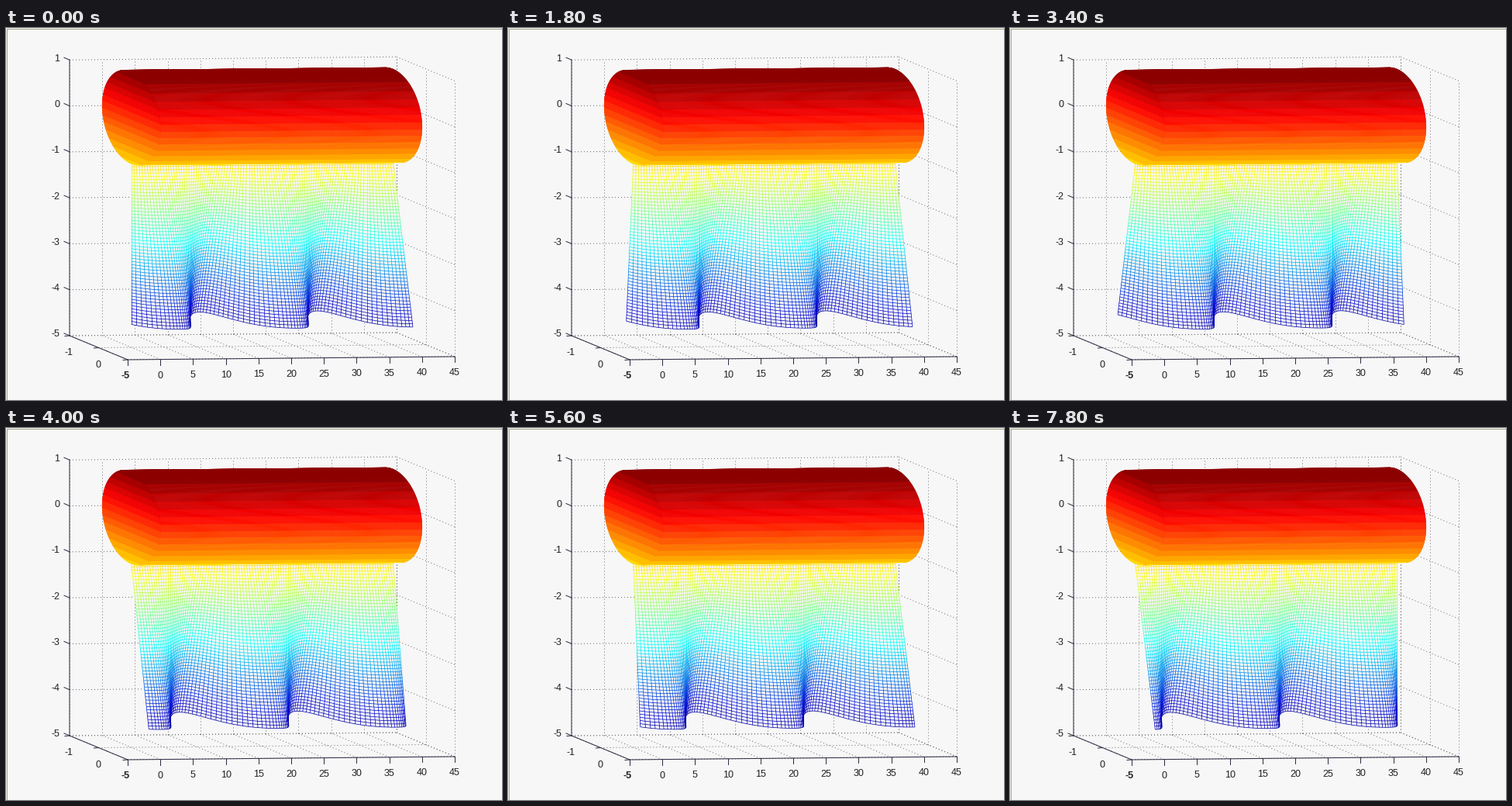
A matplotlib script that plays this animation: 640 px wide and 480 px high, repeating every 8000 ms.

```python
import numpy as np
import matplotlib.pyplot as plt
from matplotlib.animation import FuncAnimation
from matplotlib.collections import LineCollection, PolyCollection

W, H, DPI = 640, 480, 100
PX = 72 / DPI                      # one pixel in points
FRAMES, STEP = 40, 200
BG, INK = "#f7f7f7", "#2c2c44"
LENGTH, WAVE, DEPTH, SWAY = 40, 18, 3.5, 0.2
XS = np.linspace(0, LENGTH, 101)   # mesh columns
RS = np.linspace(0, DEPTH, 52)     # mesh rows


def project(x, y, z):
    """Orthographic view: data to stage pixels, stacked on the last axis."""
    x, y, z = np.broadcast_arrays(x, y, z)
    px = 82 + 8.44 * (x + 5) + 37.5 * (y + 1)
    py = 397 - 0.08 * (x + 5) + 15.5 * (y + 1) - 59.3 * (z + 5)
    return np.stack([px, py], axis=-1)


def jet(z):
    v = np.clip((np.asarray(z, float) + 5) / 6, 0, 1)
    return np.stack([np.clip(1.5 - np.abs(4 * v - c), 0, 1) for c in (3, 2, 1)], axis=-1)


fig = plt.figure(figsize=(W / DPI, H / DPI), dpi=DPI, facecolor=BG)
ax = fig.add_axes([0, 0, 1, 1])
ax.set_xlim(0, W)
ax.set_ylim(H, 0)
ax.axis("off")


def draw_box():
    xt, yt, zt = range(-5, 50, 5), (-1, 0, 1), range(-5, 2)
    grid = []
    for x in xt:
        grid.append([(x, -1, -5), (x, -1, 1)])
        grid.append([(x, -1, -5), (x, 1, -5)])
    for y in yt:
        grid.append([(45, y, -5), (45, y, 1)])
        grid.append([(-5, y, -5), (45, y, -5)])
    for z in zt:
        grid.append([(-5, -1, z), (45, -1, z)])
        grid.append([(45, -1, z), (45, 1, z)])
    lines = [project(*np.array(g, float).T) for g in grid]
    ax.add_collection(LineCollection(lines, colors="#6a6a6a", linewidths=PX,
                                     linestyles=[(0, (1, 3))], zorder=1))

    corners = np.array([(-5, -1, 1), (-5, -1, -5), (-5, 1, -5), (45, 1, -5)], float)
    ax.plot(*project(*corners.T).T, color=INK, lw=PX, zorder=2)

    font = dict(family="Liberation Sans", fontsize=12.5 * PX, color="#202020",
                va="center_baseline")

    def tick(p, dx, dy):
        ax.plot([p[0], p[0] + dx], [p[1], p[1] + dy], color=INK, lw=PX, zorder=2)

    for x in xt:
        p = project(x, 1, -5)
        tick(p, 0, 7)
        first = x == -5
        ax.text(p[0] - 3 * first, p[1] + 19.5, str(x), ha="center",
                weight="bold" if first else "normal", **font)
    for y in yt:
        p = project(-5, y, -5)
        tick(p, -6, 0.5)
        if y < 1:
            ax.text(p[0] - 1, p[1] + 21, str(y), ha="center", **font)
    for z in zt:
        p = project(-5, -1, z)
        tick(p, -7, -3)
        ax.text(69.5, p[1] - 3, str(z), ha="right", **font)


def draw_cylinder():
    tilt = np.arctan2(15.5, 59.3)

    def strips(start, end, x0, x1, left):
        a = np.linspace(start, end, 181)
        y, z = np.sin(a), np.cos(a)
        near, far = project(x0, left * y, z), project(x1, y, z)
        quads = np.stack([near[:-1], far[:-1], far[1:], near[1:]], axis=1)
        mid = (z[:-1] + z[1:]) / 2
        level = (np.floor((mid + 5) / 6 * 40) + 0.5) / 40 * 6 - 5
        color = jet(level)
        color[:, 0] = np.maximum(color[:, 0], 0.5)
        ax.add_collection(PolyCollection(quads, facecolors=color, edgecolors=color,
                                         linewidths=0.6 * PX, zorder=6))

    strips(-tilt, np.pi - tilt, 0, LENGTH, 1)    # body
    strips(0, np.pi, 0, 0, -1)                   # end cap


draw_box()
draw_cylinder()
ax.add_patch(plt.Rectangle((0.5, 0.5), W - 1, H - 1, fill=False, ec="#a4a488",
                           lw=PX, zorder=9))


def mesh_color(z):
    c = jet(z)
    return c * (0.78 + 0.22 * np.clip((z + 4.5) / 1.8, 0, 1))[:, None]


# Columns are straight, so a few coloured pieces each are enough.
cuts = np.linspace(0, DEPTH, 19)
pieces = mesh_color(-1 - (cuts[:-1] + cuts[1:]) / 2)
backing = PolyCollection([], facecolors=BG, edgecolors=BG, linewidths=0.5 * PX, zorder=3)
columns = LineCollection([], colors=np.tile(pieces, (len(XS), 1)),
                         linewidths=0.72 * PX, zorder=4)
rows = LineCollection([], colors=mesh_color(-1 - RS), linewidths=0.72 * PX, zorder=4)
for part in (backing, columns, rows):
    ax.add_collection(part)


def fin(r, angle):
    return project(XS[:, None], r * np.sin(angle), -1 - r * np.cos(angle))


def update(n):
    shift = max(2 * n - 1, 0)      # the wave first moves by half a step
    angle = SWAY * np.sin(2 * np.pi * (XS + shift) / WAVE)[:, None]
    edge = fin(np.array([0, DEPTH]), angle)
    backing.set_verts(np.stack([edge[:-1, 0], edge[1:, 0], edge[1:, 1], edge[:-1, 1]], axis=1))
    c = fin(cuts, angle)
    columns.set_segments(np.stack([c[:, :-1], c[:, 1:]], axis=2).reshape(-1, 2, 2))
    rows.set_segments(fin(RS, angle).swapaxes(0, 1))
    return backing, columns, rows


anim = FuncAnimation(fig, update, frames=FRAMES, interval=STEP,
                     init_func=lambda: update(0), repeat=True, repeat_delay=0)
plt.show()
```
